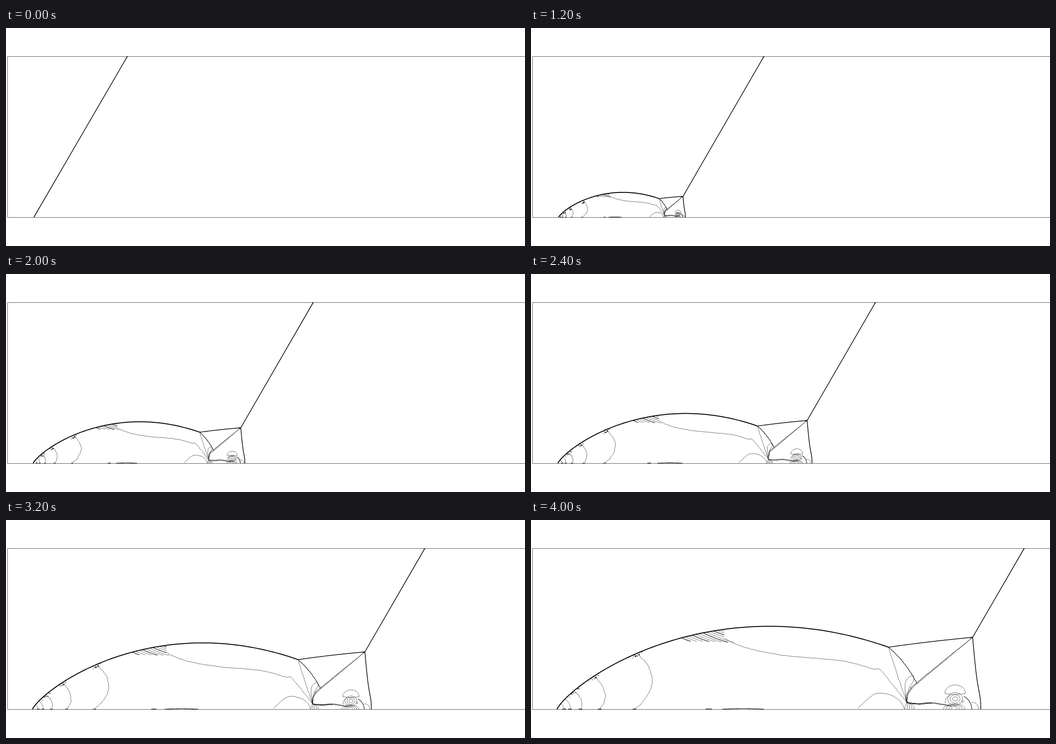
Animation, 1154 px wide and 485 px high, one loop 4.1 s. Source, as an HTML page:

```html
<!DOCTYPE html>
<html lang="en">
<head>
<meta charset="utf-8">
<title>Double Mach reflection</title>
<style>
  html, body { margin: 0; width: 100%; height: 100%; overflow: hidden; background: #fff; }
  svg { display: block; width: 100%; height: 100%; }
  path { fill: none; stroke: #000; stroke-linejoin: round; }
</style>
</head>
<body>
<svg viewBox="0 0 1154 485">
  <path d="M1160 63.5H3.5V421.5H1160" style="stroke:#555;stroke-linejoin:miter"/>
  <path id="thin" style="stroke:#333;stroke-width:.75"/>
  <path id="mid" stroke-width="1.1"/>
  <path id="shock" stroke-width="1.5"/>
  <path id="bold" stroke-width="2"/>
</svg>
<script>
const STEP = 100, COUNT = 41, TOP = 64, WALL = 421;
const layers = ['thin', 'mid', 'shock', 'bold'];
let d, s; // path data per layer, growth from 0 to 1

// Key points of the fully grown flow.
const NOSE = 58, APEX = 530, HEIGHT = 184.5;
const KINK = [795, 283], TRIPLE = [982, 261], FOOT = [1000, 421];
const JOIN = [858, 363], PINCH = [836, 406], EYE = [943, 398];

const clamp01 = v => Math.max(0, Math.min(1, v));
const lerp = (a, b, t) => a + (b - a) * t;
const rand = n => { const v = Math.sin(n * 127.1 + 11.7) * 43758.5453; return v - Math.floor(v); };
const range = (n, f) => Array.from({ length: n + 1 }, (_, i) => f(i / n));

// The flow grows in proportion to time from a point near the ramp's corner.
function place([x, y]) {
  const right = clamp01((x - KINK[0]) / (TRIPLE[0] - KINK[0]));
  const ox = right ? lerp(66.5, 62, right) : lerp(63, 66.5, (x - NOSE) / (KINK[0] - NOSE));
  const oy = WALL + 2.2 * (WALL - y) / 160 * right;
  return [lerp(ox, x, s), Math.min(WALL, lerp(oy, y, s))];
}

function line(layer, pts) {
  d[layer] += 'M' + pts.map(p => p[0].toFixed(2) + ' ' + p[1].toFixed(2)).join('L');
}

// Catmull-Rom curve through stage points, with optional pixel noise.
function smooth(layer, p, rough = 0, seed = 0) {
  const out = [p[0]];
  const jitter = n => rough * (rand(seed + n) - .5);
  for (let i = 0; i < p.length - 1; i++) {
    const a = p[i - 1] || p[i], b = p[i], c = p[i + 1], e = p[i + 2] || c;
    const parts = Math.max(2, Math.ceil(Math.hypot(c[0] - b[0], c[1] - b[1]) / 3));
    for (let j = 1; j <= parts; j++) {
      const t = j / parts, n = out.length;
      const [x, y] = [0, 1].map(m => b[m] + t / 2 * (c[m] - a[m] +
        t * (2 * a[m] - 5 * b[m] + 4 * c[m] - e[m] + t * (3 * (b[m] - c[m]) + e[m] - a[m]))));
      out.push([x + jitter(n), Math.min(WALL, y + jitter(n + 500))]);
    }
  }
  line(layer, out);
}

const curve = (layer, pts, rough, seed) => smooth(layer, pts.map(place), rough, seed);

function bend(layer, a, c, b, rough, seed) {
  curve(layer, range(4, t => [0, 1].map(m => lerp(lerp(a[m], c[m], t), lerp(c[m], b[m], t), t))), rough, seed);
}

// Ellipse arc; angles in turns, clockwise from the right.
function arc(layer, cx, cy, rx, ry, from, to, rough, seed) {
  curve(layer, range(10, t => {
    const a = lerp(from, to, t) * 2 * Math.PI;
    return [cx + rx * Math.cos(a), cy + ry * Math.sin(a)];
  }), rough, seed);
}

function bowY(x) {
  if (x > APEX) return WALL - HEIGHT + 46.5 * ((x - APEX) / (KINK[0] - APEX)) ** 2;
  const r = (APEX - x) / (APEX - NOSE);
  return WALL - HEIGHT * (1 - r * r) ** .8;
}

function shocks(k) {
  const top = [269.3 + 20.67 * k, TOP];
  line('shock', [place(TRIPLE), top]);
  line('mid', [[top[0] - 2, TOP], [top[0] + 2, TOP]]);
  if (!k) return;
  line('bold', range(120, t => {
    const x = lerp(NOSE, KINK[0], t * t);
    return place([x, bowY(x)]);
  }));
  bend('shock', KINK, [885, 270], TRIPLE);
  curve('shock', [TRIPLE, [987, 315], [992, 357], [999, 398], FOOT]);
  const [x, y] = place(TRIPLE);
  line('bold', [[x - 5, y + .7], [x, y + .7]]);
}

// Nested arcs between the nose shock and the wall, each half the last.
function noseArcs() {
  for (let i = 0; i < 5; i++) {
    const top = NOSE + 177 * .46 ** i, foot = NOSE + 172 * .55 ** i, bulge = 37 * .5 ** i;
    curve('thin', range(8, t => [
      lerp(top, foot, t) + bulge * Math.sin(Math.PI * t) ** .8,
      lerp(bowY(top), WALL, t)
    ]), i < 3 ? 2.2 : .8, i * 30);
    curve('mid', [[foot - 4, 420.6], [foot + 4, 420.6]]);
    if (i < 3) specks(top, 14 - 2 * i, i * 90);
  }
}

function specks(cx, n, seed) {
  for (let i = 0; i < n * Math.sqrt(s); i++) {
    const r = j => rand(seed + i * 3 + j);
    const x = cx + (r(0) - .5) * 22;
    const [px, py] = place([x, bowY(x)]);
    const y = py + 1 + r(1) * 5;
    line('mid', [[px, y], [px + 1 + r(2) * 2, y - .6 + r(1)]]);
  }
}

// Fine hatching that leaves the bow shock at a steeper angle.
function streaks() {
  const n = Math.round(3 + 9 * s);
  for (let i = 0; i < n; i++) {
    const f = i / n, x = 335 + 95 * f, y = bowY(x);
    const len = f < .6 ? 20 + 70 * f : 430 - x;
    bend(i % 3 ? 'thin' : 'mid', [x, y], [x + len * .5, y + len * .24], [x + len, y + len * .38]);
  }
}

function contours() {
  curve('thin', [[430, 263], [455, 276], [500, 290], [570, 302], [695, 314], [762, 332], [774, 331], [800, 361], PINCH], 1.2, 200);
  curve('thin', [[727, 419], [763, 388], [795, 388], [820, 402], [831, 421]], .8, 300);
  curve('thin', [PINCH, [832, 380], [834, 357], [848, 346], [851, 356], [840, 376], PINCH], .4, 450);
  bend('thin', KINK, [814, 345], PINCH, 1.4, 400);
  bend('mid', KINK, [832, 314], JOIN, .6, 470);
  for (let i = 0; i < 5; i++)
    bend('thin', PINCH, [832 + i * 5, 410], [831 + i * 5.5, WALL]);
  bend('mid', [425, WALL], [472, 418], [518, WALL]);
  bend('mid', [388, 420.6], [395, 420], [402, 420.6]);
}

// The slip line rolls up late, where it turns into the wall jet.
function slipLine() {
  const late = clamp01((s - .65) / .3);
  const pts = [TRIPLE, JOIN, [842, 376], [837, 394], PINCH, [862, 409], [892, 407], [935, 414]];
  for (const side of [-1, 0, 1]) {
    smooth('thin', pts.map((p, i) => {
      const [x, y] = place(p);
      const curl = i > 1 && i < 5 ? late * 3 * Math.cos(i * Math.PI) : 0;
      const gap = i ? side * (.6 + .4 * s) : 0;
      return [x + gap + curl, y + gap];
    }), .4 + .8 * late, side * 40 + 80);
  }
  if (late) curve('mid', pts.slice(3, 7), 1.5 * late, 31);
}

function vortex() {
  const [x, y] = EYE;
  arc('thin', x, y - 12, 23, 19, .5, 1, .3, 5);
  bend('thin', [x - 23, y - 12], [x, y - 8], [x + 23, y - 12]);
  for (let i = 1; i < 4; i++) arc('thin', x, y, 5.6 * i, 4.6 * i, 0, 1, .8, i * 20);
  arc('thin', x + 17, y + 6, 2, 2.5, 0, 1);
  arc('thin', x, y + 6, 22, 16, .46, .68, .4, 8);
  arc('mid', x, WALL, 37, 34, .84, 1, .4, 9);
  arc('thin', x + 40, WALL, 12, 15, .7, 1);
  for (let i = 1; i < 5; i++) arc('thin', x - 2, WALL, 6 * i, 4 + 2 * i, .5, 1);
}

function draw(k) {
  s = k / (COUNT - 1);
  d = Object.fromEntries(layers.map(n => [n, '']));
  shocks(k);
  if (k > 1) [noseArcs, streaks, contours, slipLine, vortex].forEach(part => part());
  for (const n of layers) document.getElementById(n).setAttribute('d', d[n]);
}

let shown = -1;
function tick() {
  const k = Math.floor(performance.now() / STEP) % COUNT;
  if (k !== shown) draw(shown = k);
  requestAnimationFrame(tick);
}
tick();
</script>
</body>
</html>
```
